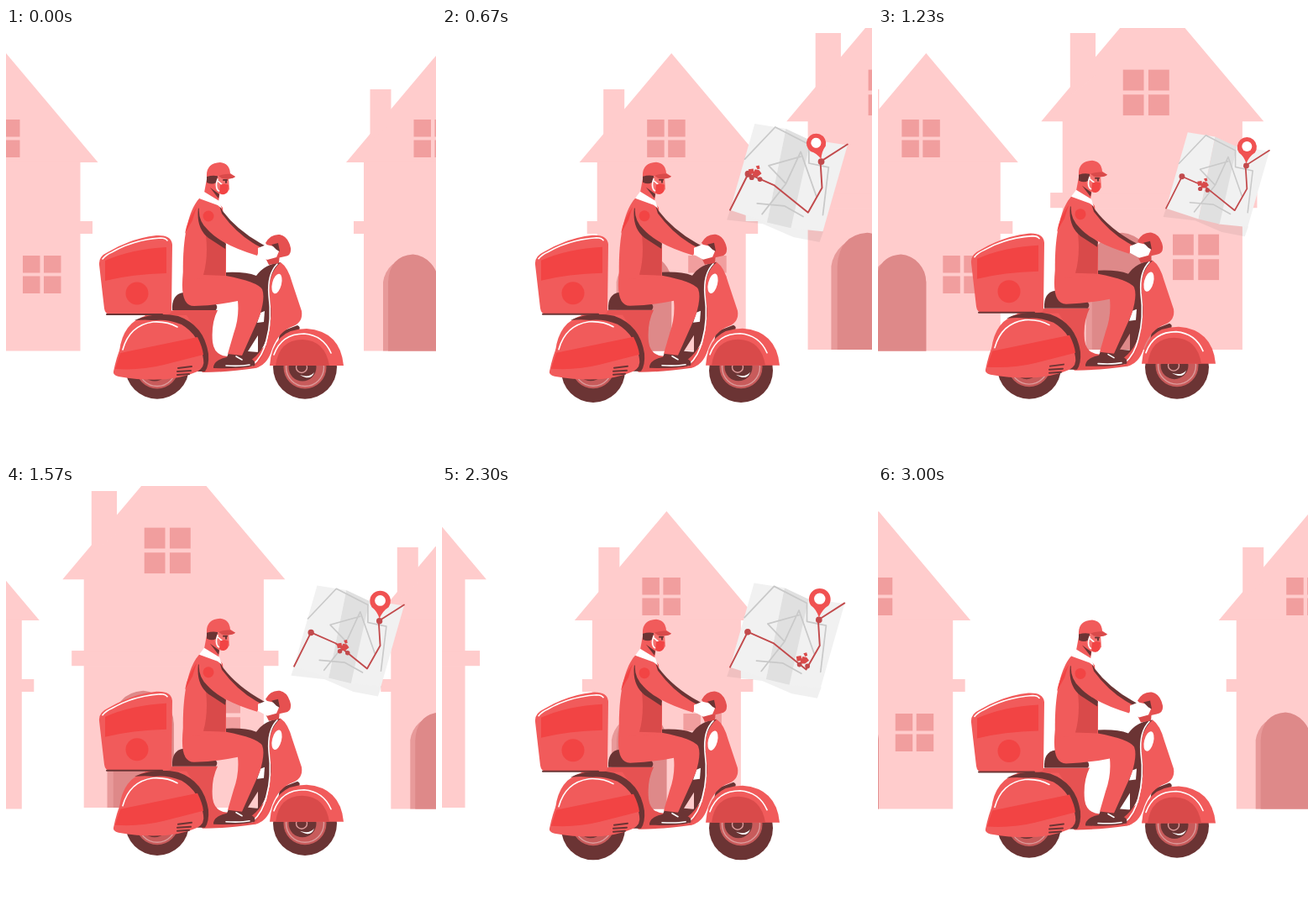
Recreate the animation shown at these times as an HTML page. Size 512 by 512 pixels, loop 3030 ms.

```html
<!DOCTYPE html>
<html lang="en">
<head>
<meta charset="utf-8">
<title>Delivery ride</title>
<style>
  html, body { margin: 0; width: 100%; height: 100%; overflow: hidden; background: #fff; }
  svg { display: block; width: 100vw; height: 100vh; }
  .red { fill: #f15b5b; }
  .hot { fill: #f24444; }
  .deep { fill: #d94a4a; }
  .dark { fill: #6b3434; }
  .white { fill: #fff; }
  .pane { fill: #f19e9e; }
  .paper { fill: #f1f1f1; }
  .line { fill: none; stroke-linecap: round; stroke-linejoin: round; stroke-width: 2; }
  .gleam { stroke: #fff; stroke-width: 1.6; }
  .ink { stroke: #6b3434; }
  .street { stroke: #c9c9c9; stroke-width: 1.8; }
  .route { stroke: #c24a4c; }
  .stop { fill: #c24a4c; }
  .rim { stroke: #dd9a9a; stroke-width: 1.4; }
</style>
</head>
<body>
<svg viewBox="0 0 512 512">
  <defs>
    <g id="window" class="pane">
      <rect id="glass" width="20.500" height="20.500"/>
      <use href="#glass" x="25"/>
      <use href="#glass" y="24.500"/>
      <use href="#glass" x="25" y="24.500"/>
    </g>
    <!-- origin: centre of the ground line -->
    <g id="house">
      <g fill="#ffcccc">
        <path d="M0-354.500L109.500-224.500H-109.500Z"/>
        <path d="M-81-250V-311.500H-56V-270Z"/>
        <rect x="-88.500" y="-225" width="177" height="225"/>
        <rect x="-100.500" y="-154.500" width="203.500" height="15"/>
      </g>
      <use href="#window" x="-29" y="-275.500"/>
      <use href="#window" x="20" y="-113.500"/>
      <path fill="#e89a9a" d="M-65.500 0V-82A33 33 0 0 1 0-82V0Z"/>
      <path fill="#de8989" d="M-59.500 0V-82Q-58-113-30-115A33 33 0 0 1 0-82V0Z"/>
    </g>
    <g id="rim">
      <circle r="25.500" fill="#c85b5b"/>
      <circle r="22.500" class="line rim"/>
      <circle cx="-3" r="16.500" class="dark"/>
      <path class="white" d="M-6 9Q5 13 11 6Q7 17-6 9Z"/>
      <circle cx="-4" r="6.500" class="line rim"/>
    </g>
  </defs>

  <g id="row"></g>

  <g id="map">
    <path opacity=".06" d="M343 214L339 226L383 231L420 247L452 253L457 239Z"/>
    <path class="paper" d="M373 109L411 115L388 229L343 214Z"/>
    <path class="paper" d="M440 128L486 135L456 240L416 236Z"/>
    <path fill="#e0e0e0" d="M411 115L441 129L417 236L388 229Z"/>
    <path class="line street" d="M361 152L398 113L439 134V157L463 162L456 220M448 197L429 143L411 182L390 160L429 149M411 182L382 219M376 206L409 209L432 222"/>
    <path class="line route" d="M343 214L365 170L397 184L438 217L455 187L453 155L486 134"/>
    <circle class="stop" cx="365" cy="170" r="4"/>
    <circle class="stop" cx="454" cy="155" r="4"/>
    <!-- origin: tip of the pin -->
    <g id="pin">
      <path fill="#f05252" d="M0 0Q-3-10-10-15A13.500 13.500 0 1 1 12-15Q4-10 0 0Z"/>
      <circle cx="1" cy="-23.500" r="7" class="white"/>
    </g>
    <g id="courier" class="deep">
      <path d="M-8-4L-2-5L-1 1L-7 2ZM1-8L5-9L6-5L3-4ZM0-4L5-3L8 1L3 5L-4 5Z"/>
      <circle class="stop" cx="-4" cy="6" r="3"/>
      <circle class="stop" cx="6" cy="8" r="3"/>
    </g>
  </g>

  <g id="tyres" class="dark">
    <circle cx="180" cy="404" r="38"/>
    <circle cx="356" cy="404" r="38"/>
  </g>

  <g id="ride">
    <use href="#rim" x="180" y="404"/>
    <use href="#rim" x="356" y="404"/>

    <!-- floor, far leg and shield -->
    <path fill="#e65252" d="M165 342L200 336H252Q244 352 246 374Q248 390 264 391L294 390L312 376Q310 402 297 405Q262 410 234 410Z"/>
    <path class="dark" fill-rule="evenodd" d="M262 291Q285 290 298 295Q308 281 327 279L313 360Q308 386 288 398L274 394L305 322L262 298ZM300 366L288 385L300 386Z"/>
    <path class="white" d="M303 339L308 337L307 350L299 351Z"/>
    <path class="dark" d="M326 362L347 354Q352 356 348 361L324 376Z"/>
    <path class="red" d="M327 279Q336 285 341 304L352 337Q354 350 342 355Q325 361 317 382Q311 403 295 405Q308 392 311 372Q318 345 314 322Q310 294 327 279Z"/>
    <path class="line gleam" d="M323 281Q311 293 313 318Q317 347 310 372Q306 391 293 402"/>
    <ellipse class="white" rx="5.500" ry="12" transform="translate(322.500 304.500) rotate(14)"/>
    <path class="deep" d="M309 274L326 268L325 280L313 282Z"/>
    <path fill="#e65050" d="M309 256Q315 245 326 246Q336 248 339 262Q340 271 332 272L323 274Z"/>

    <!-- front mudguard -->
    <path class="red" d="M314 402Q317 358 358 358Q398 361 402 402Z"/>
    <path class="deep" d="M321 402Q325 371 353 371Q380 372 385 402Z"/>
    <path class="line gleam" d="M319 389Q328 364 355 364Q378 366 387 387"/>

    <!-- rear cowl -->
    <path class="red" d="M135 385Q139 350 168 342H215L240 380L234 408H140Z"/>
    <path class="dark" d="M153 348Q178 337 205 343Q236 354 241 388Q242 402 237 409H228Q235 379 210 358Q187 345 153 348Z"/>
    <path class="red" d="M128 409Q135 374 151 357Q178 341 209 353Q231 366 235 394Q237 404 228 409Q193 425 134 415Q127 413 128 409Z"/>
    <path class="hot" d="M136 387L228 368Q234 380 235 389L188 401Q160 408 130 406Z"/>
    <path class="line gleam" d="M139 383Q147 354 175 350Q192 349 204 356"/>
    <path class="line ink" d="M205 405L221 403M204 409L220 408M204 413L218 412"/>

    <!-- seat and box -->
    <path class="dark" d="M198 336Q197 317 211 315L246 325Q254 331 250 336Z"/>
    <path class="red" d="M111 282Q110 272 121 267Q150 250 179 247Q197 246 198 258L197 337Q197 341 190 341H124Q118 341 117 334Z"/>
    <path class="hot" d="M118 277Q150 263 191 261V292Q150 293 118 301Z"/>
    <circle class="hot" cx="156" cy="316" r="13.500"/>
    <path class="line gleam" d="M115 275Q119 270 126 267Q152 252 184 250Q190 250 192 253"/>
    <path class="line ink" d="M120 341H186"/>

    <!-- leg and shoe -->
    <path class="dark" d="M247 403Q249 395 263 392L265 387L284 390L291 394Q298 396 296 402Q278 406 247 405Z"/>
    <path class="line gleam" d="M262 402Q280 403 290 401M274 391L281 395"/>
    <path class="red" d="M211 290Q206 331 224 331Q252 330 276 325Q278 345 271 364L264 388L281 390L302 343Q309 321 305 311Q299 302 262 295Z"/>

    <!-- torso and arm -->
    <path class="red" d="M231 202C219 214 209 245 211 300L262 297V262L258 214L252 207Z"/>
    <path class="hot" d="M227 213Q216 228 213 245L222 229Z"/>
    <path class="deep" d="M238 247L262 261L261 295L235 294Q241 273 238 247Z"/>
    <path class="dark" d="M229 214Q226 238 241 250L261 263L262 257L245 243Z"/>
    <path class="dark" d="M254 211L258 218Q276 242 308 259L303 263Q272 247 253 221Z"/>
    <path class="red" d="M232 204Q225 226 240 240Q256 258 299 271L303 261Q277 248 257 221L253 208Z"/>
    <circle class="hot" cx="241" cy="224" r="6.500"/>
    <path class="white" d="M300 262L310 258L319 260L325 266L322 273L311 276L300 270Z"/>
    <path class="dark" d="M316 258L324 256L326 266L322 264Z"/>

    <!-- head -->
    <path class="red" d="M239 180L256 186L253 207L236 196Z"/>
    <path class="dark" d="M243 190L254 198L253 203Z"/>
    <path class="white" d="M230 203L236 195L254 206L257 215L252 211Z"/>
    <path fill="#f4716f" d="M248 176L265 178L266 192Q262 199 256 198Q249 195 248 184Z"/>
    <path class="dark" d="M239 174H253L250 184Q246 187 239 184Z"/>
    <path class="line gleam" d="M252 180Q249 188 252 193L257 196M252 182L258 187"/>
    <path class="hot" d="M255 187Q260 184 265 187L264 195Q260 201 254 196Z"/>
    <path class="line ink" d="M259 181H263M262 182V184"/>
    <path class="red" d="M239 177Q238 161 255 160Q266 161 267 173L273 177Q268 181 257 178Q249 174 239 177Z"/>
    <path class="deep" d="M253 176Q263 173 267 174L273 177Q268 181 257 179Z"/>
  </g>
</svg>
<script>
const LOOP = 3030, TICK = 100 / 3, SPEED = 12.7, BLOCK = 1131;
const $ = id => document.getElementById(id);
const move = (el, x, y, s = 1, turn = 0) =>
  el.setAttribute('transform', `translate(${x} ${y}) rotate(${turn}) scale(${s})`);
const wave = (k, period, peak = 0) => Math.cos(2 * Math.PI * (k - peak) / period);
const ease = (k, from, to) => {
  const u = Math.min(1, Math.max(0, (k - from) / (to - from)));
  return u * u * (3 - 2 * u);
};

// two small houses and a tall one, repeated along the street
const houses = [];
function addHouse(x, y = 384.5, s = 1) {
  const el = document.createElementNS('http://www.w3.org/2000/svg', 'use');
  el.setAttribute('href', '#house');
  $('row').append(el);
  houses.push({ el, x, y, s });
}
for (let x = 0; x <= BLOCK; x += BLOCK) {
  addHouse(x);
  addHouse(x + 514.5);
  addHouse(x + 784, 383, 1.21);
}

function draw(t) {
  const k = Math.max(0, Math.floor((t - 29.9) / TICK));
  const bob = 1.5 * wave(k, 3.73) - 1.5;
  for (const h of houses) move(h.el, h.x - SPEED * k, h.y, h.s);
  move($('ride'), 0, bob);
  move($('tyres'), 0, 1 - 3 * wave(k, 56, 46));

  // the map pops up, breathes and shrinks away around its lower left corner
  const size = ease(k, 6, 12) * (1 - ease(k, 74, 82.3)) * (.93 + .07 * wave(k, 46, 59));
  $('map').style.display = size > 0 ? '' : 'none';
  move($('map'), 343 * (1 - size), 217 + bob - 214 * size, size);

  const landed = ease(k, 12, 26);
  move($('pin'), 454, 152, .6 + .4 * landed ** .5, -40 * (1 - landed));

  const x = Math.min(438, 350 + 1.23 * k);
  move($('courier'), x, 163.5 + .6 * (x - 365));
}

const start = performance.now();
function loop() {
  draw((performance.now() - start) % LOOP);
  requestAnimationFrame(loop);
}
loop();
</script>
</body>
</html>
```
